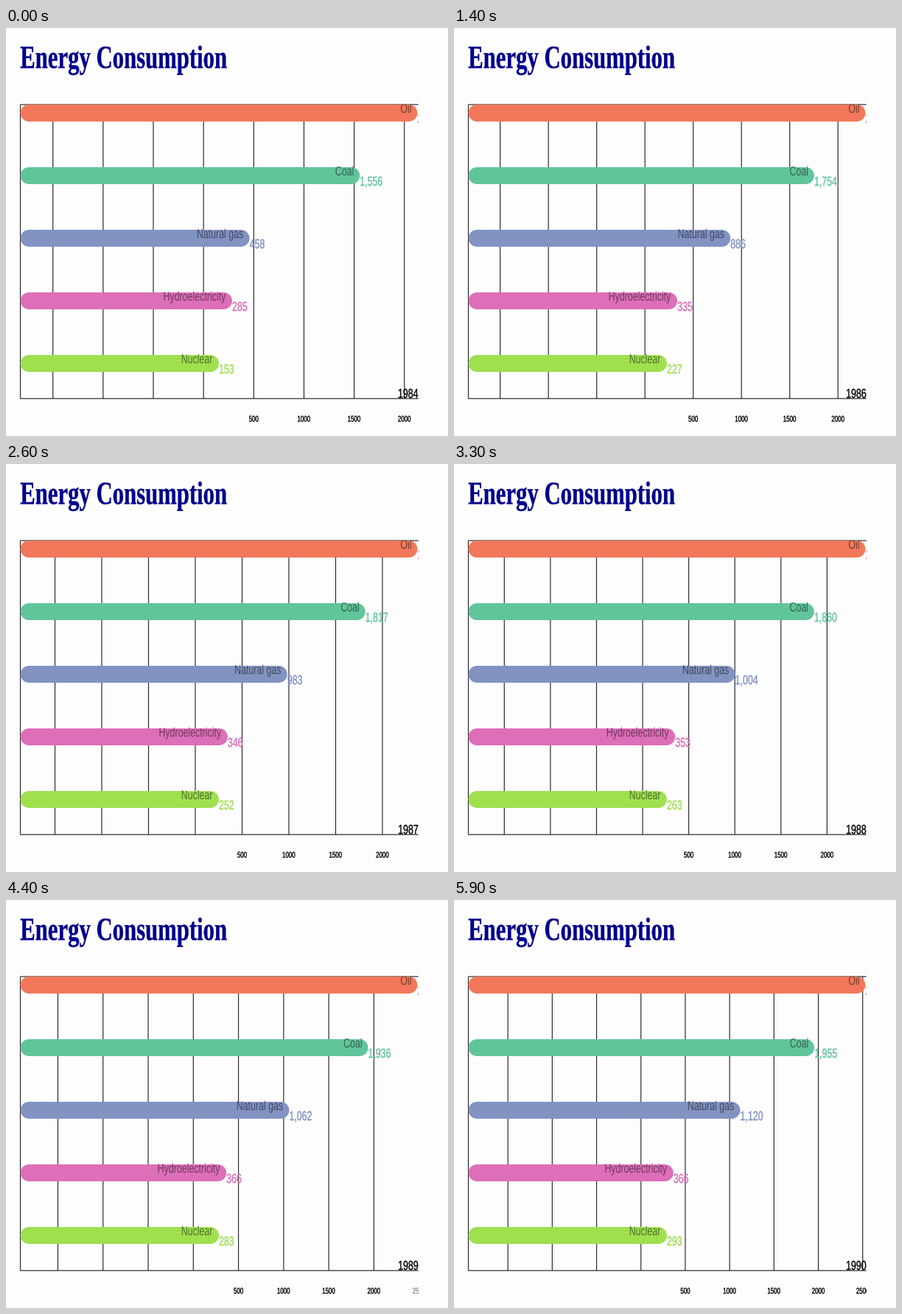
Animation of 600x554 px, one loop 6 s. Source, as a matplotlib script:

```python
import math

import numpy as np
import matplotlib.pyplot as plt
from matplotlib.animation import FuncAnimation
from matplotlib.patches import PathPatch, Rectangle
from matplotlib.textpath import TextPath
from matplotlib.transforms import Affine2D

W, H, DPI = 600, 554, 64
FRAMES, STEP = 60, 100           # frame count and ms per frame
YEAR_MS, START = 1000, 50        # length of a year, start of the first change
LEFT, RIGHT, TOP, BOTTOM = 19.5, 558.5, 104, 503.2
EDGE = 559.8                     # right edge of the visible plot
BAR_H, BAR_GAP = 23, 85
SQUASH = 0.7                     # the whole stage is narrowed, glyphs included
SANS = dict(family="Liberation Sans")
SERIF = dict(family="Liberation Serif", weight="bold")

# name: colour, value at the end of each year from 1984 on
SERIES = {
    "Oil": ("#f1785a", [2130, 2252, 2344, 2399, 2468, 2508, 2535]),
    "Coal": ("#61c59b", [1556, 1734, 1790, 1839, 1924, 1957, 1955]),
    "Natural gas": ("#8293c2", [458, 837, 977, 988, 1050, 1084, 1126]),
    "Hydroelectricity": ("#dd6eb8", [285, 331, 343, 348, 369, 361, 367]),
    "Nuclear": ("#9fe04f", [153, 218, 245, 258, 279, 291, 293]),
}
YEAR_ENDS = START + YEAR_MS * np.arange(7)
TICKS = range(-2000, 2501, 500)

fig = plt.figure(figsize=(W / DPI, H / DPI), dpi=DPI, facecolor="#fefdfe")
ax = fig.add_axes([0, 0, 1, 1])
ax.set_xlim(0, W)
ax.set_ylim(H, 0)
ax.axis("off")
clip = Rectangle((0, TOP), EDGE, H - TOP, transform=ax.transData)


def px(n):
    """Pixels to points."""
    return n * 72 / DPI


def line(xs, ys, width=1.2, color="#2a2a2f", z=1, cap="butt"):
    art, = ax.plot(xs, ys, color=color, lw=px(width), zorder=z,
                   solid_capstyle=cap, snap=False)
    return art


class Label:
    """Outlined text that can be moved and rewritten."""

    def __init__(self, size, color, anchor="start", font=SANS, alpha=1,
                 weight=0.35, clipped=True):
        self.size, self.anchor, self.font = size, anchor, font
        self.patch = PathPatch(TextPath((0, 0), "0", size=1, prop=font),
                               fc=color, ec=color, lw=px(weight),
                               alpha=alpha, zorder=4)
        ax.add_patch(self.patch)
        if clipped:
            self.patch.set_clip_path(clip)

    def put(self, text, x, y):
        path = TextPath((0, 0), text, size=self.size, prop=self.font)
        box = path.get_extents()
        shift = {"start": 0, "middle": (box.x0 + box.x1) / 2,
                 "end": box.x1}[self.anchor]
        move = Affine2D().translate(-shift, 0).scale(SQUASH, -1).translate(x, y)
        self.patch.set_path(move.transform_path(path))


class Bar:
    def __init__(self, name, row, color):
        self.name = name
        self.y = TOP + BAR_H / 2 + row * BAR_GAP
        self.body = line([], [], BAR_H, color, 3, "round")
        self.title = Label(17.7, "black", "end", alpha=0.5, weight=0)
        self.value = Label(17.7, color)

    def update(self, value, end):
        r = BAR_H / 2
        self.body.set_data([LEFT + r, end - r], [self.y, self.y])
        self.title.put(self.name, end - 8.8, self.y - 0.3)
        self.value.put(f"{value:,.0f}", end, self.y + 13.6)


Label(43.9, "#00008b", font=SERIF, clipped=False).put(
    "Energy Consumption", 19.2, 54.3)
line([LEFT, EDGE], [TOP, TOP])
line([LEFT, EDGE], [BOTTOM, BOTTOM])
line([LEFT, LEFT], [TOP, BOTTOM])

grid = {v: line([], []) for v in TICKS}
tick_labels = {v: Label(11.3, "black", "middle") for v in TICKS if v > 0}
bars = [Bar(name, row, color) for row, (name, (color, _)) in
        enumerate(SERIES.items())]
year_label = Label(17.7, "black", "end")


def draw(i):
    t = i * STEP
    values = [np.interp(t, YEAR_ENDS, data) for _, data in SERIES.values()]
    high, low = max(values), min(values)
    # the smallest bar always reaches the middle of the plot
    mid, scale = (LEFT + RIGHT) / 2, (RIGHT - LEFT) / 2 / (high - low)

    def pos(v):
        return mid + (v - low) * scale

    for bar, value in zip(bars, values):
        bar.update(value, pos(value))
    for v, art in grid.items():
        x = pos(v)
        art.set_data([x, x], [TOP, BOTTOM])
        art.set_visible(LEFT < x < EDGE)
    for v, label in tick_labels.items():
        label.put(str(v), pos(v), 534.5)
    # the last tick fades in during 1989
    tick_labels[2500].patch.set_alpha(
        float(np.clip((t - YEAR_ENDS[4]) / YEAR_MS, 0, 1)))
    year_label.put(str(1984 + math.ceil((t - START) / YEAR_MS)), 559.2, 502.2)
    return []


anim = FuncAnimation(fig, draw, frames=FRAMES, interval=STEP, repeat=True,
                     init_func=lambda: draw(0))
plt.show()
```
